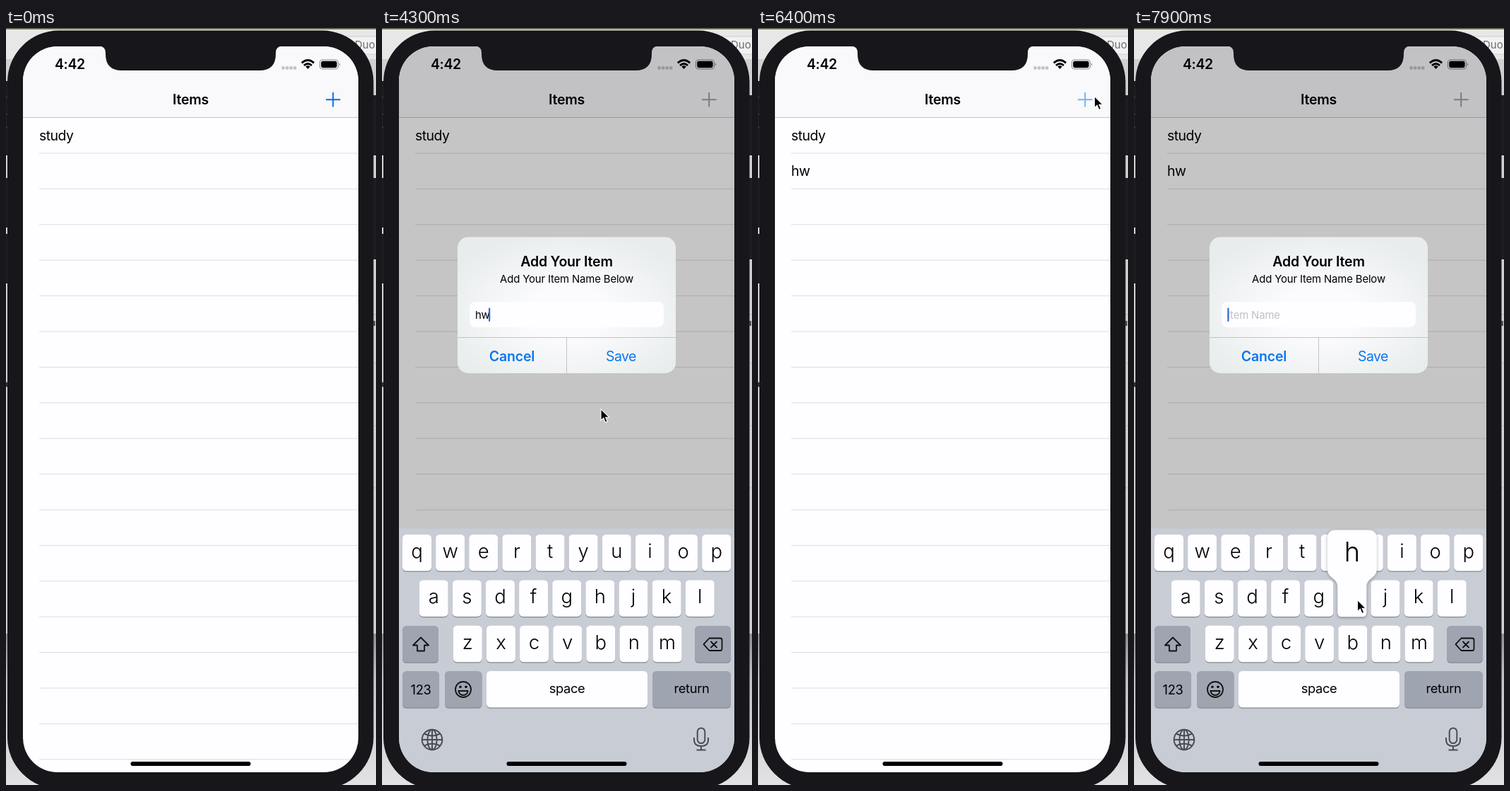
These frames come from a looping animation (524 by 1070 pixels, 8 s). An HTML page:

```html
<!DOCTYPE html>
<html lang="en">
<head>
<meta charset="utf-8">
<title>To-do list</title>
<style>
  html, body { margin: 0; width: 100%; height: 100%; overflow: hidden; background: #d4d4d5; }
  svg { display: block; font-family: Inter, Roboto, sans-serif; }
  text { white-space: pre; }
  .body { font-size: 19.5px; letter-spacing: -.03em; }
  .bold { font-size: 19.5px; font-weight: 600; letter-spacing: -.01em; }
  .small { font-size: 14.9px; letter-spacing: -.01em; }
  .mid { text-anchor: middle; }
  .blue { fill: #0a76f0; }
  .key { font-size: 27.5px; font-weight: 300; text-anchor: middle; }
  .word { font-size: 18.3px; letter-spacing: -.02em; text-anchor: middle; }
  .line { fill: none; stroke: #4a4d55; stroke-width: 2; }
  .icon { fill: none; stroke: #111; stroke-width: 1.8; stroke-linejoin: round; stroke-linecap: round; }
  #pop { filter: drop-shadow(0 1px 2px rgba(0, 0, 0, .3)); }
</style>
</head>
<body>
<svg width="524" height="1070" viewBox="0 0 524 1070">
  <defs>
    <clipPath id="screen"><rect x="24" y="26" width="475" height="1026" rx="49"/></clipPath>
    <radialGradient id="glass" cx=".5" cy=".56" r=".62">
      <stop offset=".3" stop-color="#fbfbfd"/>
      <stop offset="1" stop-color="#e8ecec"/>
    </radialGradient>
    <linearGradient id="floor" x1="0" y1="0" x2="0" y2="1">
      <stop offset="0" stop-color="#8f8f92"/>
      <stop offset=".3" stop-color="#c4c4c6"/>
      <stop offset="1" stop-color="#e2e2e4"/>
    </linearGradient>
  </defs>

  <!-- desktop behind the phone -->
  <rect width="524" height="1070" fill="#d0d0d1"/>
  <rect width="524" height="44" fill="#e8e7e8"/>
  <rect width="524" height="2" fill="#6f6d58"/>
  <rect x="440" y="12" width="90" height="25" fill="#f3f2f3" stroke="#cfced0"/>
  <text x="494" y="29" font-size="15" fill="#6c6b6d">Duo N</text>
  <g fill="#1e1d20">
    <path d="M0 75H12V180H0zM0 212H12V282H0zM0 291H12V361H0z"/>
    <path d="M512 95H524V180H512zM512 212H524V327H512z"/>
  </g>
  <path d="M0 98H3M0 122H3M0 140H3" stroke="#555"/>
  <path d="M520 405H524M520 474H524M520 562H524M520 650H524" stroke="#b5b4b6"/>
  <circle cx="0" cy="504" r="3.5" fill="#333"/>
  <rect x="519" y="414" width="4" height="7" fill="#555"/>
  <rect y="856" width="524" height="214" fill="url(#floor)"/>

  <rect x="2" y="3.5" width="518.5" height="1072" rx="73" fill="#17161a"/>

  <g clip-path="url(#screen)">
    <rect x="24" y="26" width="475" height="1026" fill="#fefdff"/>
    <rect x="24" y="26" width="475" height="100.5" fill="#f9f8fb"/>
    <path d="M24 126.5H499" stroke="#c6c5c9"/>
    <g id="rows" stroke="#dddce0"></g>
    <text class="bold mid" x="261.5" y="108">Items</text>
    <text class="body" x="47" y="159">study</text>
    <text class="body" id="added" x="47" y="209.4">hw</text>
    <path id="plus" d="M453 101.3H473.5M463.2 91V111.6" stroke-width="2"/>

    <text class="bold" x="69" y="58.3" style="letter-spacing:-.02em">4:42</text>
    <g fill="#c3c2c6">
      <circle cx="392.6" cy="56.5" r="2.4"/><circle cx="398.2" cy="56.5" r="2.4"/>
      <circle cx="403.7" cy="56.5" r="2.4"/><circle cx="409.2" cy="56.5" r="2.4"/>
    </g>
    <g fill="none" stroke="#000" stroke-width="2.8">
      <path d="M418.8 49.4Q427.5 41.6 436.2 49.4M422 53Q427.5 48 433 53"/>
      <path d="M424.3 54.6Q427.5 51.9 430.7 54.6L427.5 58Z" fill="#000" stroke="none"/>
    </g>
    <rect x="444.3" y="45" width="26.2" height="13" rx="4" fill="none" stroke="#8d8c90" stroke-width="1.1"/>
    <rect x="446.2" y="46.8" width="22.4" height="9.4" rx="2.4"/>
    <path d="M472 49.3Q474.4 51.5 472 53.7Z" fill="#8d8c90"/>

    <rect id="dim" x="24" y="26" width="475" height="1026"/>

    <g id="board">
      <rect x="24" y="707.5" width="475" height="363" fill="#c8ccd4"/>
      <g id="keys"></g>
      <path class="icon" d="M55 861.5L66 872.5H60V880.5H50V872.5H44Z"/>
      <path class="icon" d="M463.5 862.5H479Q481.5 862.5 481.5 865V877.5Q481.5 880 479 880H463.5L455.5 871.2ZM466 867.5L474 875.5M474 867.5L466 875.5"/>
      <circle class="icon" cx="115" cy="935" r="11"/>
      <path class="icon" d="M108.3 937H121.7Q120.5 943 115 943T108.3 937Z"/>
      <circle cx="111" cy="931.3" r="1.7"/><circle cx="119" cy="931.3" r="1.7"/>
      <g class="line">
        <circle cx="71" cy="1006" r="14.3"/>
        <ellipse cx="71" cy="1006" rx="6.6" ry="14.3"/>
        <path d="M71 991.7V1020.3M56.7 1006H85.3M60 997.5Q71 1003.5 82 997.5M60 1014.5Q71 1008.5 82 1014.5"/>
        <rect x="446.7" y="989.5" width="10.6" height="21.5" rx="5.3"/>
        <path d="M442 1003V1006Q442 1015 452 1015T462 1006V1003M452 1015V1020.5M445.5 1020.5H458.5"/>
      </g>
      <g id="pop">
        <path d="M-35-59q0-12 12-12h46q12 0 12 12v43c0 14-14.5 12-14.5 26v36q0 6-6 6h-29q-6 0-6-6v-36c0-14-14.5-12-14.5-26z" fill="#fefdff"/>
        <text id="popText" class="key" y="-26" style="font-size:38px"></text>
      </g>
    </g>

    <g id="alert">
      <rect x="107" y="295.5" width="309" height="192.5" rx="15" fill="url(#glass)"/>
      <path id="press" d="M262 438H416V473Q416 488 401 488H262Z" fill="#d6d8da"/>
      <path id="split" d="M107 437.5H416M261.5 437.5V488" stroke="#c3c5c8"/>
      <rect x="124" y="387" width="275" height="36" rx="8" fill="#fefdff"/>
      <text class="bold mid" x="261.5" y="336.5">Add Your Item</text>
      <text class="small mid" x="261.5" y="360">Add Your Item Name Below</text>
      <text class="small" id="hint" x="132" y="410.5" fill="#c1c0c4">Item Name</text>
      <text class="small" id="typed" x="132" y="410.5" style="letter-spacing:-.02em"></text>
      <rect id="caret" y="395.5" width="2.2" height="19.5" rx="1" fill="#2f6bd6"/>
      <text class="bold mid blue" x="184" y="470.5">Cancel</text>
      <text class="body mid blue" x="338.5" y="470.5">Save</text>
    </g>
  </g>

  <path d="M132 25.5Q141 26 141 35V37Q141 60 164 60H359Q382 60 382 37V35Q382 26 391 25.5Z" fill="#17161a"/>
  <rect x="176.5" y="1037" width="170" height="6" rx="3"/>
  <path id="cursor" d="M0 0V16.2L3.8 12.7L6.4 19L9.2 17.8L6.6 11.7H11.6Z" stroke="#fff" stroke-width="1.1"/>
</svg>

<script>
const $ = id => document.getElementById(id);
const LOOP = 8000, STEP = 100, TRAVEL = 363;

// static parts
let lines = '';
for (let i = 0; i < 18; i++) {
  const y = 177 + i * 50.4;
  lines += `<path d="M47 ${y}H499"/>`;
}
$('rows').innerHTML = lines;

function cap(x, y, w, dark) {
  const box = (dy, fill) =>
    `<rect x="${x}" y="${y + dy}" width="${w}" height="51.5" rx="5.5" fill="${fill}"/>`;
  return box(1.3, '#85888f') + box(0, dark ? '#9fa4b1' : '#fefdff');
}
const spots = {};
let keys = '';
[['qwertyuiop', 29], ['asdfghjkl', 52.7], ['zxcvbnm', 100.8]].forEach(([row, x], r) => {
  const y = 716 + r * 64.4;
  [...row].forEach((c, i) => {
    const left = x + i * 47.13, mid = left + 20.5;
    spots[c] = [mid, y];
    keys += cap(left, y, 41, false) + `<text class="key" x="${mid}" y="${y + 33}">${c}</text>`;
  });
});
keys += cap(29, 845, 51, true) + cap(443, 845, 51, true);
[['123', 29, 52, true], ['', 89, 52.5, true], ['space', 148, 228, false], ['return', 383, 111, true]]
  .forEach(([word, x, w, dark]) => {
    const y = word === '123' ? 941.5 : 940;
    keys += cap(x, 909, w, dark) + `<text class="word" x="${x + w / 2}" y="${y}">${word}</text>`;
  });
$('keys').innerHTML = keys;

// motion
const path = [
  [1500, 460, 105], [1700, 442, 205], [2000, 375, 560], [2300, 326, 780], [2500, 322, 806],
  [2800, 318, 813], [3500, 316, 810], [3700, 205, 772], [3900, 100, 746], [4000, 103, 746],
  [4100, 121, 749], [4300, 309.5, 538], [4600, 327, 483], [4800, 326, 466], [5000, 319, 475],
  [5100, 318, 481], [5400, 322, 472], [5600, 330, 450], [5800, 352, 395], [6200, 470, 112],
  [6300, 476, 96], [6600, 476, 96], [6900, 432, 260], [7300, 342, 690], [7600, 318, 800], [7800, 316, 808]
];
const fadeOut = [[5000, 1], [5100, .65], [5200, .22], [5300, 0]];
const fadeIn = [[6400, 0], [6500, .5], [6600, .93], [6700, 1]];

function at(t, frames) {
  let a = frames[0];
  for (const b of frames) {
    if (t < b[0]) {
      const u = Math.max(0, (t - a[0]) / (b[0] - a[0] || 1));
      return a.slice(1).map((v, i) => v + (b[i + 1] - v) * u);
    }
    a = b;
  }
  return a.slice(1);
}
const within = (t, a, b) => t >= a && t < b;
const show = (id, on) => $(id).setAttribute('visibility', on ? 'inherit' : 'hidden');
const set = (id, name, v) => $(id).setAttribute(name, v);

// critically damped spring: 1 at rest, falling to 0
function spring(ms, rate) {
  const x = Math.max(0, ms) / 1000 * rate;
  return (1 + x) * Math.exp(-x);
}
function blink(ms) {
  const p = ms % 1000;
  if (p < 500) return 1;
  if (p < 650) return 1 - (p - 500) / 150;
  return p < 900 ? 0 : (p - 900) / 100;
}
const mix = (a, b, u) => `rgb(${a.map((v, i) => Math.round(v + (b[i] - v) * u))})`;

function draw(t) {
  const second = t >= 5800;
  const p = t < 1500 ? 0 : second ? at(t, fadeIn)[0] : at(t, fadeOut)[0];
  const rise = second ? spring(t - 6405, 22) : 0;
  const drop = second ? rise : t < 1500 ? 1 : 1 - spring(t - 5048, 16);

  set('dim', 'opacity', .225 * p);
  set('board', 'transform', `translate(0 ${drop * TRAVEL})`);
  show('board', drop < .99);

  const k = 1 + .2 * rise;
  set('alert', 'transform', `translate(261.5 ${391.75 + rise * 157}) scale(${k}) translate(-261.5 -391.75)`);
  set('alert', 'opacity', Math.min(1, p * 1.1));
  show('alert', p > 0);
  show('split', p === 1);
  show('press', within(t, 4900, 5100));

  const word = second ? '' : t >= 4100 ? 'hw' : t >= 3600 ? 'h' : '';
  $('typed').textContent = word;
  show('hint', !word);
  const origin = second ? 6600 : t >= 4100 ? 4100 : t >= 3600 ? 3600 : 900;
  set('caret', 'x', [132.3, 141.2, 151][word.length]);
  set('caret', 'opacity', within(t, 5100, 5800) ? 0 : blink(Math.max(0, t - origin)));

  const held = within(t, 3400, 3600) || t >= 7900 ? 'h' : within(t, 3900, 4100) ? 'w' : '';
  show('pop', held);
  if (held) {
    $('popText').textContent = held;
    set('pop', 'transform', `translate(${spots[held]})`);
  }

  const tapped = t === 6400;
  set('plus', 'stroke', tapped ? '#76b3ef' : mix([10, 112, 226], [160, 158, 163], p));
  show('added', t >= 5400);

  const [x, y] = at(t, path);
  set('cursor', 'transform', `translate(${x + .5} ${y + .5})`);
  show('cursor', t >= 700);
}

const start = performance.now();
function tick() {
  const t = (performance.now() - start) % LOOP;
  draw(Math.floor((t + .5) / STEP) * STEP % LOOP);
  requestAnimationFrame(tick);
}
tick();
</script>
</body>
</html>
```
